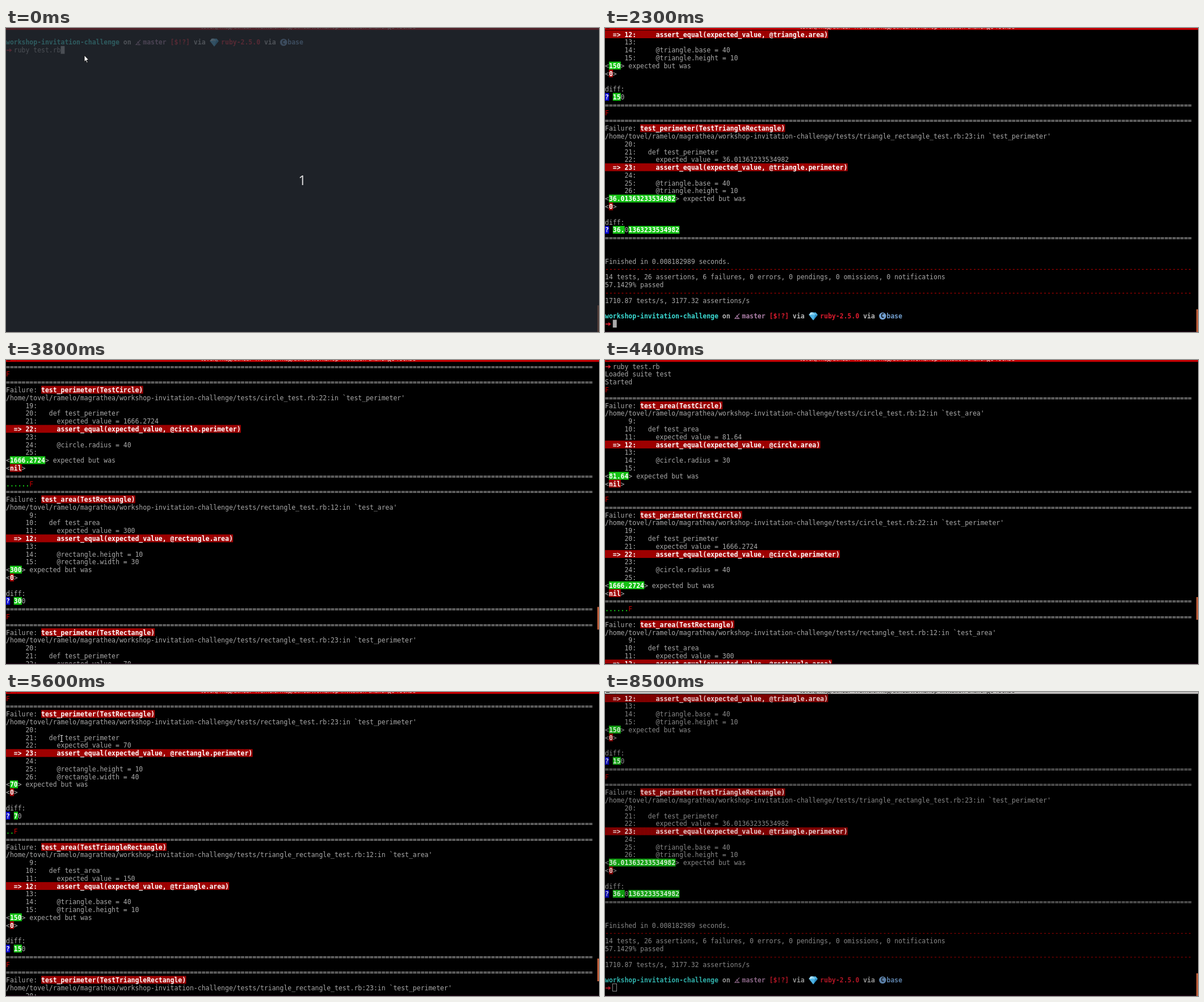
An HTML page with a canvas that plays this animation: 1045x536 px, repeating every 8600 ms.

```html
<!DOCTYPE html>
<html lang="en">
<head>
<meta charset="utf-8">
<title>Terminal test run</title>
<style>
  html, body { margin: 0; width: 100%; height: 100%; overflow: hidden; background: #000; }
  canvas { display: block; }
</style>
</head>
<body>
<canvas id="stage" width="1045" height="536"></canvas>
<script>
const ctx = document.getElementById('stage').getContext('2d');
const WIDTH = 1045, HEIGHT = 536, LOOP = 8600;
const CELL_W = 6.893, CELL_H = 13.79, TOP = 4.2, BASELINE = 11.45;
const MONO = '"DejaVu Sans Mono", monospace';
const SANS = '"Open Sans", "Noto Sans", sans-serif';
const HOME = '/home/tovel/ramelo/magrathea/workshop-invitation-challenge/tests/';

// "~x" inside a line switches to style x: [colour, background, bold]
const STYLES = {
  0: ['#aaaaaa'],
  R: ['#ffffff', '#9e0000', true],
  G: ['#ffffff', '#14c414', true],
  B: ['#ffffff', '#0000c8', true],
  f: ['#c80000'],
  g: ['#14c414', null, true],
  c: ['#3cdcd4', null, true],
  w: ['#b8b8b8', null, true],
  m: ['#ad7fa8', null, true],
  r: ['#dd1c2e', null, true],
  b: ['#729fcf', null, true]
};

const RULE = '='.repeat(150);
const DASHES = '~f' + '-'.repeat(150);
const PROMPT = '~cworkshop-invitation-challenge ~won ~m∡ master ~r[$!?] ~wvia ◆  ~rruby-2.5.0 ~wvia ~b© base';

function failure(marks, shape, test, line, value, after, got, diff) {
  const klass = shape.split('_').map(w => w[0].toUpperCase() + w.slice(1)).join('');
  const obj = '@' + shape.split('_')[0];
  const row = (n, text) => String(n).padStart(7) + ':' + text;
  const out = [
    marks + '~fF', RULE,
    `Failure: ~Rtest_${test}(Test${klass})`,
    `${HOME}${shape}_test.rb:${line}:in \`test_${test}'`,
    row(line - 3, ''),
    row(line - 2, `   def test_${test}`),
    row(line - 1, `     expected_value = ${value}`),
    `~R  => ${line}:     assert_equal(expected_value, ${obj}.${test})`,
    row(line + 1, ''),
    row(line + 2, `     ${obj}.${after[0]}`),
    row(line + 3, after[1] ? `     ${obj}.${after[1]}` : ''),
    `<~G${value}~0> expected but was`,
    `<~R${got}~0>`
  ];
  if (diff) out.push('', 'diff:', '~B?~0 ' + diff);
  return [...out, RULE];
}

const triangle = ['base = 40', 'height = 10'];
const lines = [
  '➜ ruby test.rb', 'Loaded suite test', 'Started',
  ...failure('', 'circle', 'area', 12, '81.64', ['radius = 30'], 'nil'),
  ...failure('', 'circle', 'perimeter', 22, '1666.2724', ['radius = 40'], 'nil'),
  ...failure('~g......', 'rectangle', 'area', 12, '300', ['height = 10', 'width = 30'], '0', '~G30~00'),
  ...failure('', 'rectangle', 'perimeter', 23, '70', ['height = 10', 'width = 40'], '0', '~G7~00'),
  ...failure('~g..', 'triangle_rectangle', 'area', 12, '150', triangle, '0', '~G15~00'),
  ...failure('', 'triangle_rectangle', 'perimeter', 23, '36.01363233534982', triangle, '0',
    '~G36.~00~G1363233534982'),
  '', '', 'Finished in 0.008182989 seconds.', DASHES,
  '14 tests, 26 assertions, 6 failures, 0 errors, 0 pendings, 0 omissions, 0 notifications',
  '57.1429% passed', DASHES, '1710.87 tests/s, 3177.32 assertions/s',
  '', PROMPT, '➜'
];

// [time, value...]
const SCROLL = [
  [0, -2], [1100, 70], [1300, 71], [1400, 72],
  [2800, 68], [2900, 64], [3000, 60], [3100, 56], [3200, 48],
  [3300, 40], [3400, 32], [3500, 24], [3600, 20], [3800, 16], [3900, 12],
  [4100, 8], [4200, 4], [4400, 0], [4900, 4],
  [5100, 8], [5200, 16], [5300, 24], [5400, 32], [5500, 40], [5600, 48],
  [5700, 56], [5900, 60], [6100, 64], [6500, 68], [6600, 72]
];
// lines printed, cursor column
const OUTPUT = [[0, 1, 14], [1000, 2, 0], [1100, 108, 0], [1300, 109, 0], [1400, 110, 2]];
const CURSOR = [
  [0, 'on'], [600, 'off'], [800, 'on'], [1400, 'off'], [2300, 'on'], [2600, 'off'],
  [6600, 'on'], [6800, 'off'], [7500, 'on'], [8100, 'hollow']
];
const POINTER = [
  [0, 'arrow', 138, 48], [600, 'beam', 138, 48], [800, ''],
  [5200, 'beam', 98, 82], [5900, 'beam', 96.5, 84], [7300, 'beam', 98, 95],
  [7500, 'beam', 112, 87], [7600, 'beam', 136, 74], [7700, 'beam', 164, 58],
  [7800, 'beam', 192, 42], [7900, 'beam', 216, 29], [8000, 'beam', 231, 21], [8100, '']
];

const at = (table, t) => table.findLast(step => step[0] <= t).slice(1);

function box(x, y, w, h, fill) {
  ctx.fillStyle = fill;
  ctx.fillRect(x, y, w, h);
}

function poly(fill, x, y, ...pts) {
  ctx.fillStyle = fill;
  ctx.beginPath();
  for (let i = 0; i < pts.length; i += 2) ctx.lineTo(x + pts[i], y + pts[i + 1]);
  ctx.closePath();
  ctx.fill();
}

const ICONS = {
  '➜'(x, y) {
    box(x + 1, y + 6.6, 6, 1.8, '#dd1c2e');
    poly('#dd1c2e', x, y, 5.5, 3.8, 10.6, 7.5, 5.5, 11.2, 6.8, 7.5);
  },
  '∡'(x, y) {
    ctx.strokeStyle = STYLES.m[0];
    ctx.lineWidth = 1.2;
    ctx.beginPath();
    ctx.moveTo(x + 9.5, y + 3);
    ctx.lineTo(x + 1.5, y + 11.5);
    ctx.lineTo(x + 10, y + 11.5);
    ctx.moveTo(x + 4, y + 6.2);
    ctx.quadraticCurveTo(x + 7.5, y + 8, x + 7, y + 12.5);
    ctx.stroke();
  },
  '◆'(x, y) {
    const alpha = ctx.globalAlpha;
    ctx.globalAlpha = 1;
    poly('#4fb4e4', x, y, 4, .8, 13, .8, 16.3, 5, 8.5, 14.8, .8, 5);
    poly('#b5e5fa', x, y, 4, .8, 8.5, .8, 5.3, 5, .8, 5);
    poly('#8ad3f3', x, y, 8.5, .8, 11.8, 5, 5.3, 5);
    poly('#2c8fc7', x, y, 11.8, 5, 16.3, 5, 8.5, 14.8);
    ctx.globalAlpha = alpha;
  },
  '©'(x, y) {
    ctx.fillStyle = STYLES.b[0];
    ctx.beginPath();
    ctx.arc(x + 6.7, y + 7.2, 6.3, 0, 7);
    ctx.fill();
    ctx.fillStyle = '#000';
    ctx.font = `bold 10px ${MONO}`;
    ctx.fillText('C', x + 3.6, y + 10.8);
  }
};

function drawLine(line, y) {
  let style = STYLES[0], col = 0;
  for (let i = 0; i < line.length; i++) {
    const ch = line[i];
    if (ch === '~') {
      style = STYLES[line[++i]];
      continue;
    }
    const x = col++ * CELL_W;
    if (ICONS[ch]) {
      ICONS[ch](x, y);
      continue;
    }
    const [color, back, bold] = style;
    if (back) box(x, y, CELL_W + .3, CELL_H, back);
    if (ch === ' ') continue;
    ctx.font = `${bold ? 'bold ' : ''}11.45px ${MONO}`;
    ctx.fillStyle = color;
    ctx.fillText(ch, x, y + BASELINE);
  }
}

function drawCursor(kind, col, row) {
  const x = col * CELL_W, y = TOP + row * CELL_H;
  if (kind === 'on') box(x, y, CELL_W, CELL_H, '#aaaaaa');
  if (kind === 'hollow') {
    ctx.strokeStyle = '#aaaaaa';
    ctx.lineWidth = 1;
    ctx.strokeRect(Math.round(x) - .5, Math.round(y) + .5, 7, 13);
  }
}

function drawTitle(active) {
  box(0, 0, WIDTH, 3.3, active ? '#c40003' : '#c0bebd');
  const ink = active ? '#ffffff' : '#000000';
  box(2, 0, 6, 1, active ? '#400' : ink);
  box(18, 0, 1, 3, active ? '#a80003' : '#aaa8a6');
  ctx.save();
  ctx.beginPath();
  ctx.rect(0, 0, WIDTH, 3);
  ctx.clip();
  ctx.fillStyle = ink;
  ctx.font = `10.4px ${SANS}`;
  ctx.textAlign = 'center';
  ctx.fillText('tovel@magrathea: ~/ramelo/magrathea/workshop-invitation-challenge 150x38', 533, 1);
  ctx.restore();
}

function drawPointer(kind, x, y) {
  if (kind === 'arrow') {
    ctx.lineWidth = 1;
    ctx.strokeStyle = '#111';
    poly('#fff', x, y, 0, 0, 0, 11.5, 2.6, 9.2, 4.4, 13.4, 6.2, 12.6, 4.4, 8.6, 7.8, 8.4);
    ctx.stroke();
  }
  if (kind === 'beam') {
    for (const [grow, color] of [[.6, '#000'], [0, '#ddd']]) {
      box(x - .6 - grow, y - 6 - grow, 1.2 + 2 * grow, 12 + 2 * grow, color);
      for (const end of [-6, 5])
        box(x - 2.4 - grow, y + end - grow, 4.8 + 2 * grow, 1 + 2 * grow, color);
    }
  }
}

function draw(t) {
  const [scroll] = at(SCROLL, t), [count, col] = at(OUTPUT, t);
  const active = t < 8500, fresh = t < 1100;
  box(0, 0, WIDTH, HEIGHT, '#000');

  ctx.save();
  ctx.beginPath();
  ctx.rect(0, 3, 1042, 532);
  ctx.clip();
  if (!active) ctx.globalAlpha = .8;
  for (let row = 0; row <= 38; row++) {
    const i = scroll + row;
    const line = i === -1 ? PROMPT : i < count ? lines[i] : '';
    // the command's own output has not arrived yet
    if (line && !(fresh && i > 0)) drawLine(line, TOP + row * CELL_H);
  }
  drawCursor(at(CURSOR, t)[0], col, count - 1 - scroll);
  ctx.restore();

  drawTitle(active);
  box(0, 535, WIDTH, 1, '#24061a');
  if (fresh) box(1042, 489, 3, 47, '#bc5c38');
  else box(1042, 418 + scroll * 1.083, 3, 40, '#bc5c38');

  if (t < 300) {
    box(0, 0, WIDTH, HEIGHT, 'rgba(41,46,55,.74)');
    ctx.font = `24px ${SANS}`;
    ctx.fillStyle = '#e2e2e2';
    ctx.textAlign = 'center';
    ctx.fillText('1', 522, 276.5);
    ctx.textAlign = 'left';
  }
  drawPointer(...at(POINTER, t));
}

let shown = -1;
const start = performance.now();
function tick() {
  const t = Math.floor((performance.now() - start) % LOOP / 100) * 100;
  if (t !== shown) draw(shown = t);
  requestAnimationFrame(tick);
}
tick();
</script>
</body>
</html>
```
